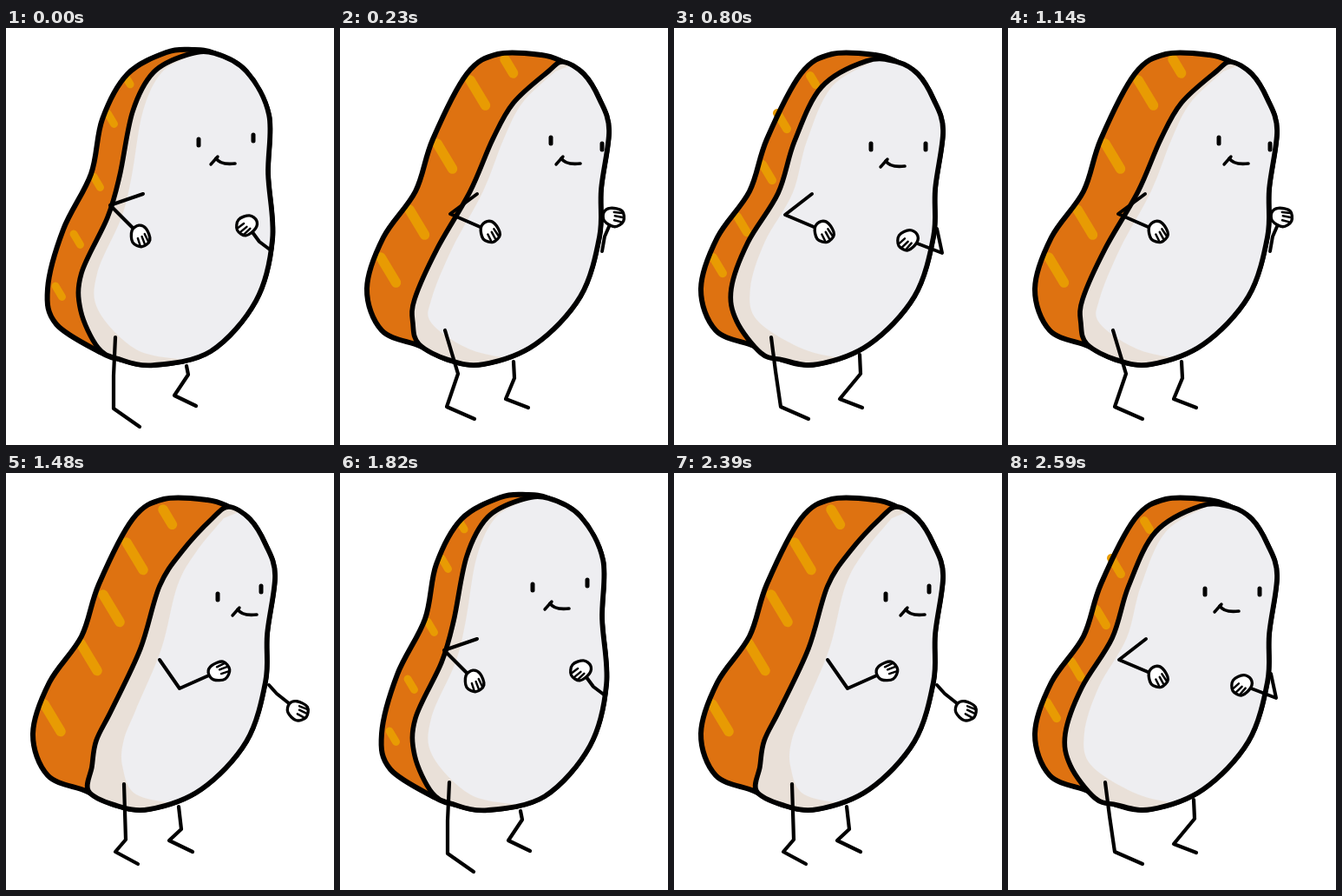
Recreate the animation shown at these times as an HTML page. Size 378 by 480 pixels, loop 2720 ms.

```html
<!DOCTYPE html>
<html lang="en">
<head>
<meta charset="utf-8">
<title>Dancing toast</title>
<style>
  html, body { margin: 0; width: 100%; height: 100%; overflow: hidden; background: #fff; }
  svg { display: block; width: 378px; height: 480px; }
  path { fill: none; stroke-linecap: round; stroke-linejoin: round; }
</style>
</head>
<body>
<svg id="stage" viewBox="0 0 378 480"></svg>
<script>
const INK = '#000', CRUST = '#de7211', MARK = '#e89b03', RICE = '#eeeef1', SHADE = '#e9e0d8';
const pts = s => s.split(' ').map(p => p.split(',').map(Number));

// Blends numbers, lists and objects of the same form
function mix(a, b, k) {
  if (typeof a === 'number') return a + (b - a) * k;
  if (Array.isArray(a)) return a.map((v, i) => mix(v, b[i], k));
  return Object.fromEntries(Object.keys(a).map(key => [key, mix(a[key], b[key], k)]));
}

// Smooth curve through the points
function curve(p, closed) {
  const n = p.length;
  const at = i => closed ? p[(i + n) % n] : p[Math.max(0, Math.min(n - 1, i))];
  let d = 'M' + p[0];
  for (let i = 0; i < (closed ? n : n - 1); i++) {
    const [a, b, c, e] = [at(i - 1), at(i), at(i + 1), at(i + 2)];
    const c1 = b.map((v, k) => v + (c[k] - a[k]) / 6);
    const c2 = c.map((v, k) => v - (e[k] - b[k]) / 6);
    d += `C${c1} ${c2} ${c}`;
  }
  return d + (closed ? 'Z' : '');
}
const line = p => 'M' + p.join('L');

// Two silhouettes, clockwise: right side, then crust back
const upright = {
  side: pts('240,29 277,50 303,100 302,168 307,243 288,314 236,372 170,388 130,381'),
  back: pts('110,374 58,341 48,300 66,232 98,168 111,105 140,53 185,28 215,25')
};
const leaning = {
  side: pts('257,39 281,53 299,82 310,118 301,185 299,240 277,309 225,364 165,387 125,382'),
  back: pts('92,366 48,348 31,300 50,241 87,188 107,128 146,53 182,30 232,31')
};

// Key points per pose; arms run shoulder, elbow, hand
const front = {
  body: upright,
  seam: pts('208,31 170,51 146,96 131,170 117,218 87,282 86,325 106,368'), shadeWidth: 15,
  marks: pts('139,58 117,98 101,171 78,237 57,297'), markLength: 15, markWidth: 9,
  eyes: pts('222,127 285,122'), mouth: [236, 157],
  arms: ['158,191 120,204 155,239', '304,255 292,246 278,227'].map(pts), turns: [8, 80],
  legs: ['126,356 124,400 124,438 154,459', '208,389 210,399 194,423 219,435'].map(pts)
};
const turned = {
  body: leaning,
  seam: pts('240,50 200,86 176,128 150,188 112,254 86,312 84,340 91,364'), shadeWidth: 16,
  marks: pts('190,36 150,60 112,133 80,209 47,264'), markLength: 35, markWidth: 11.5,
  eyes: pts('243,125 302,132'), mouth: [249, 157],
  arms: ['158,191 127,214 173,234', '302,257 305,240 315,217'].map(pts), turns: [0, -50],
  legs: ['121,348 136,398 123,436 155,450', '200,384 201,403 191,427 217,437'].map(pts)
};
const reach = {
  body: leaning,
  seam: pts('238,52 203,90 177,130 155,202 122,272 104,308 99,338 95,366'), shadeWidth: 26,
  marks: pts('181,42 139,80 112,140 86,196 44,266'), markLength: 38, markWidth: 11.5,
  eyes: pts('244,138 294,129'), mouth: [261, 164],
  arms: ['177,215 200,248 245,228', '303,244 312,254 336,273'].map(pts), turns: [-82, -35],
  legs: ['136,358 138,422 126,436 152,450', '199,384 202,410 188,423 215,436'].map(pts)
};
const between = { ...mix(turned, reach, .5), legs: reach.legs };
const back = {
  body: leaning,
  seam: pts('222,38 170,68 139,130 120,190 85,247 66,300 72,337 100,374'), shadeWidth: 18,
  marks: pts('157,55 119,98 102,157 73,217 45,264'), markLength: 22, markWidth: 10,
  eyes: pts('227,132 290,132'), mouth: [238, 160],
  arms: ['159,191 128,215 173,234', '303,231 309,259 270,244'].map(pts), turns: [0, 75],
  legs: ['112,356 117,395 123,436 155,450', '214,376 215,398 191,427 217,437'].map(pts)
};

const stroke = (d, width, color = INK) => `<path d="${d}" stroke="${color}" stroke-width="${width}"/>`;
const fill = (d, color, extra = '') => `<path d="${d}" style="fill:${color}" ${extra}/>`;
const place = ([x, y], shape, more = '') => `<g transform="translate(${x} ${y}) ${more}">${shape}</g>`;

const eye = stroke('M0,1V8', 5);
const mouth = stroke('M0,0L8,-9', 3.4) + stroke('M6,-7Q11,1 28,-1', 3.6);
const fist = fill(curve(pts('-12,-5 -4,-13 6,-10 13,4 4,14 -9,10'), true), '#fff', `stroke="${INK}" stroke-width="3.8"`) +
  stroke('M-3,4L1,12M2,1L7,10M5,-3L11,6', 2.8);

// Grill marks slant down from the crust edge; the top one is shorter
function grill({ marks, markLength, markWidth }) {
  return marks.map(([x, y], i) => {
    const len = markLength * (i ? 1 : .55);
    return stroke(line([[x, y], [x + len * .5, y + len * .83]]), markWidth, MARK);
  }).join('');
}

// The shaded rim follows the seam and widens downwards
function lightArea({ seam, shadeWidth }) {
  const last = seam.length - 1;
  const edge = seam.slice(0, last).map(([x, y], i) => [x + shadeWidth * (.5 + i / last), y]);
  return curve([...edge, [150, 370], [205, 382]]) + 'L378,400L378,0Z';
}

function draw(p, i) {
  const { side, back } = p.body;
  const outline = curve([...side, ...back], true);
  const rice = curve([...p.seam, ...[...side].reverse()], true);
  return `<clipPath id="clip${i}"><path d="${rice}"/></clipPath>` +
    fill(outline, CRUST) + grill(p) + stroke(outline, 6) +
    fill(rice, SHADE) + fill(lightArea(p), RICE, `clip-path="url(#clip${i})"`) + stroke(rice, 5.6) +
    p.legs.map(l => stroke(line(l), 4.2)).join('') +
    p.arms.map((a, k) => stroke(line(a), 4) + place(a[2], fist, `rotate(${p.turns[k]}) scale(.88)`)).join('') +
    p.eyes.map(e => place(e, eye)).join('') + place(p.mouth, mouth);
}

const stage = document.getElementById('stage');
const poses = [front, turned, between, reach, back];
stage.innerHTML = poses.map((p, i) => `<g visibility="hidden">${draw(p, i)}</g>`).join('');
const groups = [...stage.children];

// Steps last 170 ms, apart from a few longer or shorter ones
const LOOP = 2720;
const holds = Array(15).fill(170);
holds[0] = holds[3] = holds[10] = 230;
holds[13] = 200;
holds[14] = 130;
const begin = performance.now();
function tick() {
  let t = (performance.now() - begin) % LOOP, step = 0;
  while (t >= holds[step]) t -= holds[step++];
  groups.forEach((g, i) => g.setAttribute('visibility', i === step % poses.length ? 'visible' : 'hidden'));
  requestAnimationFrame(tick);
}
tick();
</script>
</body>
</html>
```
